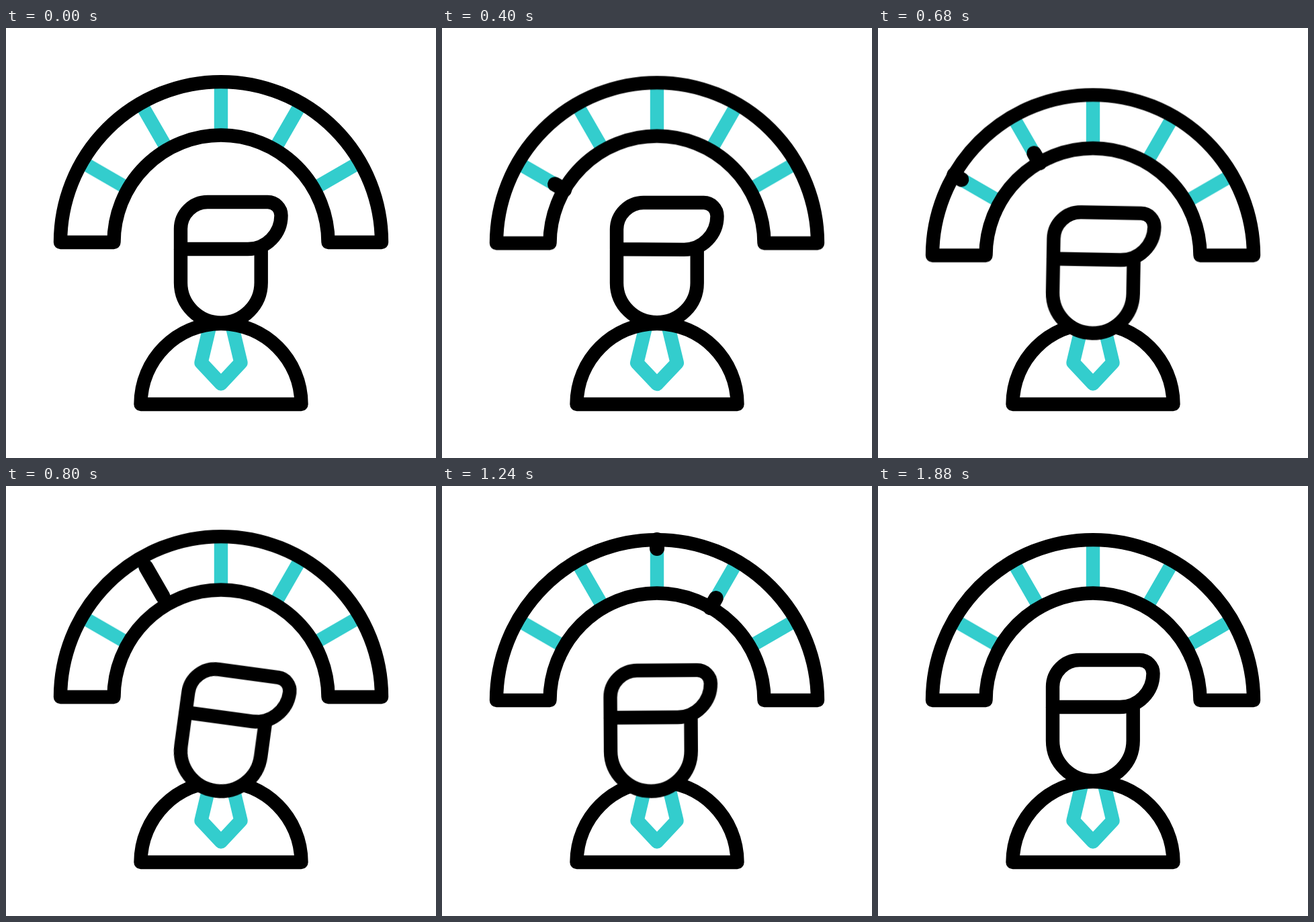
Write an HTML page that moves like this. It is 640 by 640 pixels and loops after 2 s.

```html
<!DOCTYPE html>
<html lang="en">
<head>
<meta charset="utf-8">
<title>Person under a gauge</title>
<style>
  html, body { margin: 0; width: 100%; height: 100%; overflow: hidden; background: #fff; }
  svg { display: block; width: 100vw; height: 100vh; }

  path { fill: none; stroke: #000; stroke-width: 20.4; stroke-linejoin: round; }
  .teal { stroke: #33cdcd; }
  .solid { fill: #fff; }

  #gauge, #man, #head, #hair, #face, #body, #tie {
    animation: 2s cubic-bezier(.333, 0, .667, 1) infinite;
  }
  #gauge { animation-name: gauge; }
  #man { animation-name: jump; }
  #head { animation-name: nod; transform-origin: 320px 379px; }
  #hair { animation-name: hair; }
  #face { animation-name: face; }
  #body { animation-name: body; }
  #tie { animation-name: tie; }

  .lit {
    visibility: hidden;
    stroke-width: 22;
    stroke-linecap: round;
    animation: sweep 2s linear calc(var(--i) * 280ms) infinite;
  }

  @keyframes gauge {
    0%, 18% { transform: translateY(0); }
    32% { transform: translateY(22px); }
    46% { transform: translateY(-22px); }
    60%, 100% { transform: translateY(0); }
  }

  @keyframes jump {
    0%, 4% { transform: translateY(0); }
    11% { transform: translateY(-28px); }
    18%, 100% { transform: translateY(0); }
  }

  @keyframes nod {
    0%, 18% { transform: translate(0, 0) rotate(0deg); }
    32% { transform: translate(0, 15.5px) rotate(0deg); }
    41%, 46% { transform: translate(0, 15.5px) rotate(8deg); }
    60% { transform: translate(-9.5px, 15.5px) rotate(-.9deg); }
    74% { transform: translate(0, 15.5px) rotate(8deg); }
    91%, 100% { transform: translate(0, 0) rotate(0deg); }
  }

  /* stretch in the air, squash after landing */
  @keyframes hair {
    0%, 4%, 18%, 32%, 100% { d: path("M260 329V299C260 277 278 259 300 259H389.5C400.5 259 409.5 268 409.5 279C409.5 306.6 387.4 329 360 329Z"); }
    12% { d: path("M260 329V291C260 269 278 251 300 251H389.5C400.5 251 409.5 260 409.5 271C404 301.5 406 326.5 362 329Z"); }
    26% { d: path("M260 324.6V299C260 277 278 259 300 259H389.5C400.5 259 409.5 268 409.5 279C409.5 306.6 389 328 363 328Z"); }
  }

  @keyframes face {
    0%, 4%, 18%, 32%, 100% { d: path("M260 329V379C260 412 287 438.7 320 438.7C353 438.7 379.7 412 379.7 379V329"); }
    12% { d: path("M260 329V371C260 404 287 430.5 320 430.5C353 430.5 379.7 404 379.7 371V329"); }
    26% { d: path("M260 329V375.5C260 406 287 429.2 320 429.2C353 429.2 379.7 406 379.7 375.5V329"); }
  }

  @keyframes body {
    0%, 4%, 18%, 100% { d: path("M200.5 560C200.5 494 254 440 320 440C386 440 439.5 494 439.5 560Z"); }
    12% { d: path("M200.5 560C204 478 254 431 320 431C386 431 436 478 439.5 560Z"); }
  }

  @keyframes tie {
    0%, 4%, 18%, 32%, 100% { d: path("M304.5 439L290.5 498L320 529.5L349.5 498L335.5 439"); }
    12% { d: path("M304.5 430L290.5 486.5L320 517L349.5 486.5L335.5 430"); }
    26% { d: path("M304.5 439L288.3 501L320 532.5L351.7 501L335.5 439"); }
  }

  /* the front runs out in 200 ms, the back follows from 120 to 360 ms */
  @keyframes sweep {
    0%, 17.99% { visibility: hidden; stroke-dasharray: 0 200; stroke-dashoffset: 0; }
    18% { visibility: visible; stroke-dasharray: 0 200; stroke-dashoffset: 0; }
    24% { visibility: visible; stroke-dasharray: 48 200; stroke-dashoffset: 0; }
    28% { visibility: visible; stroke-dasharray: 53.3 200; stroke-dashoffset: -26.7; }
    36% { visibility: visible; stroke-dasharray: 0 200; stroke-dashoffset: -80; }
    36.01%, 100% { visibility: hidden; stroke-dasharray: 0 200; stroke-dashoffset: -80; }
  }
</style>
</head>
<body>
<svg viewBox="0 0 640 640">
  <g id="gauge">
    <path class="teal" d="M320 160V80" transform="rotate(-60 320 319)"/>
    <path class="teal" d="M320 160V80" transform="rotate(-30 320 319)"/>
    <path class="teal" d="M320 160V80"/>
    <path class="teal" d="M320 160V80" transform="rotate(30 320 319)"/>
    <path class="teal" d="M320 160V80" transform="rotate(60 320 319)"/>
    <path d="M81 319A239 239 0 0 1 559 319H479.5A159.5 159.5 0 0 0 160.5 319Z"/>
    <path class="lit" style="--i:0" d="M320 160V80" transform="rotate(-60 320 319)"/>
    <path class="lit" style="--i:1" d="M320 160V80" transform="rotate(-30 320 319)"/>
    <path class="lit" style="--i:2" d="M320 160V80"/>
    <path class="lit" style="--i:3" d="M320 160V80" transform="rotate(30 320 319)"/>
    <path class="lit" style="--i:4" d="M320 160V80" transform="rotate(60 320 319)"/>
  </g>
  <g id="man">
    <path id="tie" class="teal"/>
    <path id="body"/>
    <g id="head">
      <path id="face" class="solid"/>
      <path id="hair" class="solid"/>
    </g>
  </g>
</svg>
</body>
</html>
```
